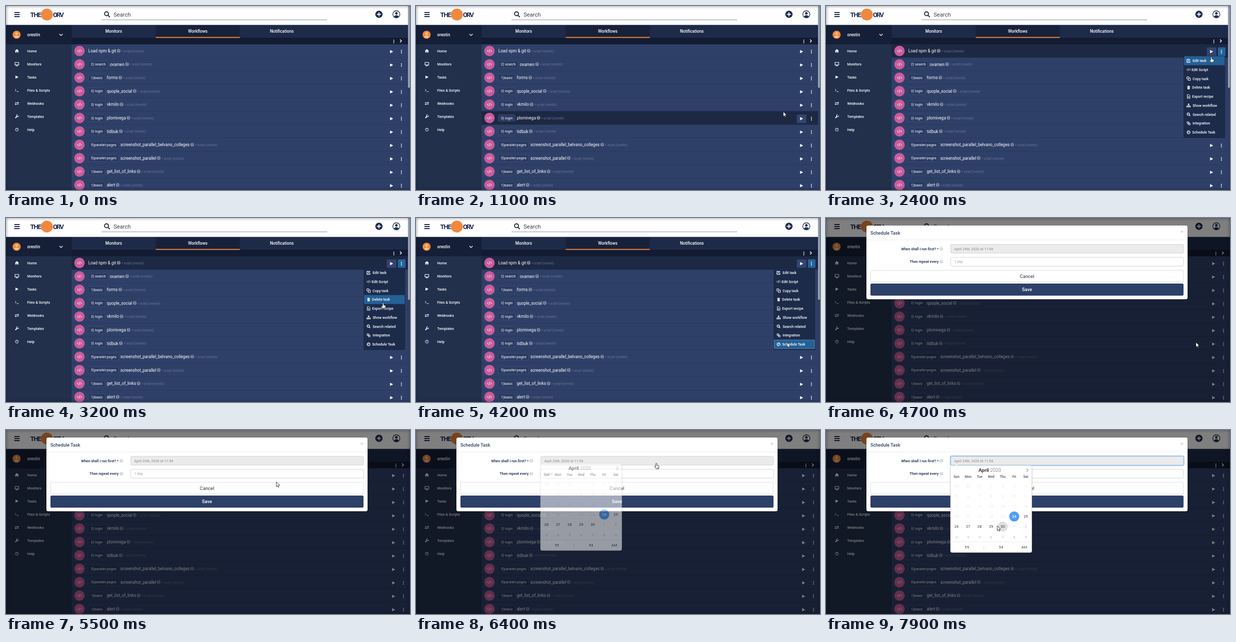
An HTML page that plays this animation: 800x365 px, repeating every 8000 ms.

```html
<!DOCTYPE html>
<html lang="en">
<head>
<meta charset="utf-8">
<title>Schedule a task</title>
<style>
html, body { margin: 0; width: 100%; height: 100%; overflow: hidden; background: #22304c; }
svg { position: absolute; left: 0; top: 0; display: block; }
text { font-family: Roboto, Arial, sans-serif; white-space: pre; }
.edge { position: absolute; left: 0; top: 0; width: 800px; height: 365px; box-shadow: inset 0 0 6px rgba(10, 15, 35, .5); }
.line { fill: none; stroke: currentColor; }
</style>
</head>
<body>
<svg id="stage" width="800" height="365" viewBox="0 0 800 365"></svg>
<div class="edge"></div>
<script>
const LOOP = 8000, STEP = 100;
const ROW_TOP = 75.8, ROW_H = 26.6, ITEM_TOP = 99.6, ITEM_H = 17.75;
const DAY_X = 258.5, DAY_Y = 111, DAY_W = 22.85, DAY_H = 20.2;
const NAVY = '#1c2b4f', ORANGE = '#f0883e';
const USER = 'orestin';
const svg = document.getElementById('stage');

// y is the vertical middle of the text
const text = (x, y, s, size, fill = '#fff', more = '') =>
  `<text x="${x}" y="${(y + size * .355).toFixed(2)}" font-size="${size}" fill="${fill}" ${more}>${s.replace(/&/g, '&amp;').replace(/</g, '&lt;')}</text>`;
const rect = (x, y, w, h, fill, more = '') =>
  `<rect x="${x}" y="${y}" width="${w}" height="${h}" fill="${fill}" ${more}/>`;
const circle = (x, y, r, fill, more = '') =>
  `<circle cx="${x}" cy="${y}" r="${r}" fill="${fill}" ${more}/>`;
const path = (d, fill = '#fff', more = '') => `<path d="${d}" fill="${fill}" ${more}/>`;
const stroke = (d, color = '#fff', w = 1, more = '') =>
  `<path d="${d}" class="line" color="${color}" stroke-width="${w}" ${more}/>`;
const group = (id, s, more = '') => `<g id="${id}" ${more}>${s}</g>`;
const at = (x, y, s) => `<g transform="translate(${x} ${y})">${s}</g>`;
const MID = 'text-anchor="middle"', END = 'text-anchor="end"';
const W5 = 'font-weight="500"', W7 = 'font-weight="700"';

const play = (x, y) => path(`M${x - 2.7} ${y - 3.2}l6 3.2-6 3.2z`);
const dots = (x, y) => [-2.7, 0, 2.7].map(d => circle(x, y + d, .95, '#fff')).join('');
const help = (x, y, back, front) => circle(x, y, 3.6, back) + text(x, y, '?', 5.6, front, MID + W7.padStart(18));
const code = (x, y, k = 1) => stroke(
  `M${x - 2.2 * k} ${y - 2 * k}l${-2.2 * k} ${2 * k} ${2.2 * k} ${2 * k}M${x + 2.2 * k} ${y - 2 * k}l${2.2 * k} ${2 * k} ${-2.2 * k} ${2 * k}M${x + .9 * k} ${y - 3 * k}l${-1.8 * k} ${6 * k}`, '#fff', .9);
const lens = (x, y, r, color, w) => stroke(
  `M${x + r} ${y}a${r} ${r} 0 1 0 ${-2 * r} 0a${r} ${r} 0 1 0 ${2 * r} 0M${x + r * .7} ${y + r * .7}l${r} ${r}`, color, w);

function header() {
  return rect(0, 0, 800, 37.5, '#fff') +
    stroke('M16.5 13h10.5M16.5 17h10.5M16.5 21h10.5', NAVY, 1.8) +
    text(48, 17, 'THE', 13, NAVY, W7 + ' letter-spacing="-1.2"') +
    circle(81, 17, 11.8, ORANGE) +
    text(93, 17, 'ORV', 13, NAVY, W7 + ' letter-spacing="-1.9"') +
    lens(199, 15.4, 3.9, '#222b40', 1.9) +
    text(213, 16.7, 'Search', 11.1, '#3a3d45') +
    rect(189, 27, 447, 1, '#8d8fb0') +
    circle(738.5, 16.5, 7.2, NAVY) + stroke('M734.5 16.5h8M738.5 12.5v8', '#fff', 1.8) +
    circle(773, 16.5, 7, '#fff', `stroke="${NAVY}" stroke-width="1.3"`) +
    circle(773, 14.4, 2.5, NAVY) + path('M768.2 20.4q4.8-4.4 9.6 0-4.8 5-9.6 0z', NAVY);
}

function sidebar() {
  const icons = [
    path('M-4 .3l4-3.8 4 3.8h-1.1v3.2h-2v-2.2h-1.8v2.2h-2v-3.2z'),
    stroke('M-3.7-3h7.4v4.8h-7.4zM-2 3.6h4', '#fff', 1.1),
    play(0, 0),
    stroke('M-3.6-2.4l2.2 2.2-2.2 2.2M-.4 2.6h4', '#fff', .9),
    stroke('M-3.8-1.4h6.6M3.8 1.6h-6.6', '#fff', 1.1) + path('M2-3.3l2.2 1.9-2.2 1.9zM-2-.3l-2.2 1.9 2.2 1.9z'),
    stroke('M-3 3l3.6-3.6', '#fff', 1.8) + stroke('M3.4-1.8a2 2 0 1 1-1.8-1.8', '#fff', 1.2),
    circle(0, 0, 3, 'none', 'stroke="#fff" stroke-width=".9"') + text(0, 0, '?', 5, '#fff', MID)
  ];
  const names = ['Home', 'Monitors', 'Tasks', 'Files & Scripts', 'Webhooks', 'Templates', 'Help'];
  return rect(0, 37.5, 130, 328, '#22304c') + rect(0, 37.5, 130, 38.5, '#151f38') +
    circle(21, 57, 8, ORANGE) + circle(21, 54.6, 2.6, '#f9c08f') + path('M16 61.6q5-6 10 0-5 3.4-10 0z', '#f9c08f') +
    text(42, 57, USER, 8.2, '#fff', W5) +
    stroke('M105.8 55.5l3.2 3.2 3.2-3.2', '#fff', 1.2) +
    names.map((s, i) => {
      const y = 89.5 + 26.05 * i;
      return at(21.5, y - .5, icons[i]) + text(42, y, s, 7.05, '#fff', W5);
    }).join('');
}

function tabs() {
  return rect(130, 37.5, 670, 26, '#1d2a48') + rect(130, 63, 670, 13, '#121b32') +
    group('active', rect(0, 37.5, 166.5, 26, '#17213a') + rect(0, 61.4, 166.5, 1.9, ORANGE)) +
    ['Monitors', 'Workflows', 'Notifications'].map(s => text(0, 50.3, s, 8.2, '#fff', `class="tab" ${MID} ${W5}`)).join('') +
    group('tools', dots(768, 70.3) + stroke('M780.2 66.4l3 2.9-3 2.9', '#fff', 1.4));
}

const ROWS = [
  ['', 'Load npm & git'], ['2) search', 'ovamen'], ['1)basic', 'forms'], ['3) login', 'quople_social'],
  ['3) login', 'vkmilo'], ['3) login', 'plomivega'], ['3) login', 'tidbuk'],
  ['5)parallel-pages', 'screenshot_parallel_belvano_colleges'], ['5)parallel-pages', 'screenshot_parallel'],
  ['1)basic', 'get_list_of_links'], ['1)basic', 'alert']
];

function width(s, size) {
  svg.innerHTML = text(0, 0, s, size);
  return svg.firstChild.getComputedTextLength();
}

function row([tag, name], i) {
  const y = ROW_TOP + ROW_H * (i + .5);
  const tagEnd = 168 + width(tag, 7.1);
  const x = tag ? tagEnd + 8 : 163;
  const end = x + width(name, 8.2);
  const pill = tag ? rect(163, y - 6.5, tagEnd - 158.5, 13, '#293a61', 'rx="2" stroke="#435279" stroke-width=".7"') + text(168, y, tag, 7.1) : '';
  return circle(145.5, y, 10.3, '#c95c9c') + code(145.5, y) + pill + text(x, y, name, 8.2) +
    help(end + 5.2, y - .3, '#7d879e', '#2f4068') +
    text(end + 11, y + .4, `» script (${USER})`, 6.3, '#67749a', 'font-style="italic"');
}

function list() {
  const lines = ROWS.map((r, i) => rect(130, ROW_TOP + ROW_H * (i + 1) - .8, 670, .8, '#273759')).join('');
  const hover = rect(130, 0, 670, ROW_H, '#1d2843') + rect(754, 6.4, 19, 17, '#33446f', 'rx="1.5"');
  const body = ROWS.map(row).join('');
  const acts = ROWS.map((r, i) => play(763.3, 90.5 + ROW_H * i) + dots(783, 90.5 + ROW_H * i)).join('');
  return rect(130, 76, 670, 290, '#2f4068') + lines + group('rowHover', hover) +
    group('dotBox', rect(776, 82, 15, 17, '#24649c', 'rx="1.5"')) + body + group('acts', acts);
}

function menu() {
  const page = 'M-2.6-3.6h3.6l1.8 1.8v5.4h-5.4z';
  const items = [
    ['Edit task', 726, stroke('M1-2.6h-4.2v5.8h5.8v-2.6M-1 1l4-4', '#fff', 1.2)],
    ['Edit Script', 724, code(0, 0, .85)],
    ['Copy task', 726, stroke('M-3.4-3.4h4v4h-4zM-.8 1.2v2.4h4.4v-4.6h-2.4', '#fff', 1)],
    ['Delete task', 725, path('M-2.8-2.8h1.7v-.8h2.2v.8h1.7v1h-5.6zM-2.4-1.2h4.8l-.4 4.8h-4z')],
    ['Export recipe', 725, stroke(page, '#fff', .9) + stroke('M-1.4 0h2.8M-1.4 1.8h2.8', '#fff', .9)],
    ['Show workflow', 726, path('M-1.2-3.4h2.4v2.2h-2.4zM-4 1.2h2.2v2.2h-2.2zM-1.1 1.2h2.2v2.2h-2.2zM1.8 1.2h2.2v2.2h-2.2z') + stroke('M0-1.4v3M-2.9 1.4v-1.4h5.8v1.4', '#fff', .7)],
    ['Search related', 726, lens(-.6, -.6, 2.3, '#fff', 1.3)],
    ['Integration', 726, [-1.4, 1.4].map(d => circle(d, d, 1.8, 'none', 'stroke="#fff" stroke-width="1.1"')).join('')],
    ['Schedule Task', 725, circle(0, 0, 2.9, 'none', 'stroke="#fff" stroke-width="1.2"') + stroke('M0-1.8v2h-1.4', '#fff', .9)]
  ];
  return rect(708.5, 99.2, 81.5, 162, '#1d2b4b', 'rx="1" stroke="#17233f" stroke-width=".6"') +
    rect(709, 0, 80.5, ITEM_H, '#246197', 'id="itemHover"') +
    rect(709.3, ITEM_TOP + ITEM_H * 8 + .4, 79.8, ITEM_H - .8, 'none', 'id="focusItem" stroke="#b9d3ea" stroke-width=".7" stroke-dasharray="1 1"') +
    items.map(([s, x, icon], i) => {
      const y = ITEM_TOP + ITEM_H * (i + .5);
      return at(718, y, icon) + text(x, y, s, 7.1, '#fff', W5);
    }).join('');
}

function modal() {
  const label = (y, s) => text(223, y, s, 7.1, '#2d3f66', END + ' ' + W7) + help(228.3, y, '#d4d7dc', '#fff');
  return rect(79, 16, 638, 147, 'rgba(0,0,0,.28)', 'rx="4"') + rect(80, 15, 636, 146.3, '#fff', 'rx="3.5"') +
    text(88, 29.3, 'Schedule Task', 9.15, '#2d3f66', W5) +
    stroke('M702.8 25.3l3.6 3.6M706.4 25.3l-3.6 3.6', '#a5a5a5', .9) +
    rect(80, 43, 636, .7, '#e3e5e8') +
    label(61, 'When shall I run first? *') + label(86.5, 'Then repeat every') +
    rect(246, 51.3, 463, 19.4, 'none', 'id="glow" rx="3" stroke="#a9cdf0" stroke-width="1.6"') +
    rect(247, 52.3, 461, 17.4, '#ebebeb', 'id="dateBox" rx="2.3" stroke="#c6c9cd" stroke-width=".8"') +
    text(254, 61.2, 'April 24th, 2020 at 11:54', 7.1, '#858a92') +
    rect(247, 78, 461, 17.4, '#fff', 'rx="2.3" stroke="#c6c9cd" stroke-width=".8"') +
    text(254, 86.8, '1 day', 7.1, '#9a9fa6') +
    rect(88.4, 103.6, 619.3, 23.4, '#fff', 'rx="2.5" stroke="#d3d5d9" stroke-width=".8"') +
    text(398, 115.2, 'Cancel', 9.3, '#2a2d33', MID) +
    rect(88, 130, 620, 24, '#2d4068', 'rx="2.5"') +
    text(398, 141.7, 'Save', 9.3, '#fff', MID + ' ' + W5);
}

function calendar() {
  const col = i => DAY_X + DAY_W * (i % 7);
  let s = rect(245.5, 71.5, 163, 173, 'rgba(0,0,0,.2)', 'rx="4"') +
    rect(246.5, 70.5, 161, 172.5, '#fff', 'rx="3" stroke="#dcdcdc" stroke-width=".6"') +
    path('M255.8 70.8l2.6-2.8 2.6 2.8z') +
    text(302, 79.8, 'April', 9.8, '#333', W7) + text(325, 79.8, '2020', 9.8, '#555', 'font-weight="300"') +
    stroke('M396.8 76.6l3.4 3.4-3.4 3.4', '#555', .9) +
    circle(0, 0, 10, '#dfdfdf', 'id="dayHover"') + circle(col(5), DAY_Y + DAY_H * 3, 10, '#519ff6');
  'Sun Mon Tue Wed Thu Fri Sat'.split(' ').forEach((d, i) => s += text(col(i), 92.7, d, 6.6, '#666', MID + ' ' + W7));
  for (let i = 0; i < 42; i++) {
    const n = i < 3 ? 29 + i : i < 33 ? i - 2 : i - 32;
    const fill = i === 26 ? '#fff' : i < 26 ? '#e6e6e6' : i < 33 ? '#393939' : '#bdbdbd';
    s += text(col(i), DAY_Y + DAY_H * Math.floor(i / 7), String(n), 7.4, fill, MID + (i === 26 ? ' ' + W5 : ''));
  }
  return s + rect(246.5, 221.6, 161, .7, '#e3e3e3') +
    text(279, 232.5, '11', 7.6, '#333', MID + ' ' + W7) + text(312.5, 232, ':', 7.6, '#333', MID) +
    text(346.5, 232.5, '54', 7.6, '#444', MID) + text(392.5, 232.5, 'AM', 7.4, '#444', MID);
}

function pointer() {
  const ink = 'stroke="#15171c" stroke-width=".8" stroke-linejoin="round"';
  return group('arrow', path('M0 0v9.6l2.2-2 1.4 3.2 1.6-.7-1.4-3.1h3.1z', '#fff', ink)) +
    group('hand', path('M-1.2 1.2Q-1.2 0 0 0T1.2 1.2V4.2L4.2 5Q5.4 5.4 5.2 6.6L4.4 11H-.4L-3.6 7Q-3.8 5.6-2.4 6L-1.2 7Z', '#fff', ink) +
      stroke('M1.4 8v2M3 8v2', '#15171c', .5));
}

const scene = sidebar() + tabs() + list() + header() +
  group('bar', rect(796, 37.5, 4, 328, '#33446c') + rect(796, 0, 4, 162, '#a9b2c6')) +
  group('menu', menu()) + rect(0, 0, 800, 365, '#000', 'id="shade"') +
  group('modal', modal()) + group('calendar', calendar()) + group('cursor', pointer());
svg.innerHTML = scene;

const $ = id => document.getElementById(id);
const set = (id, attrs) => Object.entries(attrs).forEach(([k, v]) => $(id).setAttribute(k, v));
const show = (id, on) => set(id, { visibility: on ? 'visible' : 'hidden' });
const move = (id, x, y) => set(id, { transform: `translate(${x} ${y})` });
const ramp = (t, start, len) => Math.min(1, Math.max(0, (t - start) / len));

// time, x, y
const TRAIL = [
  [300, 620, 380], [900, 690, 288], [1400, 783, 92], [2200, 783, 92], [2400, 763, 101],
  [2800, 752, 199], [3000, 750, 146], [3900, 735, 247], [4500, 735, 247], [4700, 732.5, 246.5],
  [5700, 486, 67], [6000, 476, 66], [7000, 476, 66], [7800, 363, 169], [7900, 339, 190], [8000, 338, 191]
];

function cursorAt(t) {
  const i = TRAIL.findIndex(k => k[0] > t);
  const a = TRAIL[Math.max(0, i - 1)], b = TRAIL[i];
  const p = ramp(t, a[0], b[0] - a[0] || 1);
  return [a[1] + (b[1] - a[1]) * p, a[2] + (b[2] - a[2]) * p];
}

function draw(t) {
  const [x, y] = cursorAt(t);
  const open = t >= 1600 && t < 4300, shaded = t >= 4300, shift = shaded ? 4 : 0;

  move('cursor', x, y);
  const hand = (t >= 1400 && t < 4100) || (t >= 5700 && t < 7100);
  show('hand', hand);
  show('arrow', !hand);

  const hovered = t >= 1400 ? 0 : Math.floor((y - ROW_TOP) / ROW_H);
  show('rowHover', !shaded && hovered < ROWS.length);
  move('rowHover', 0, ROW_TOP + ROW_H * hovered);
  show('dotBox', t >= 1400 && !shaded);

  // the page widens when the scrollbar goes away
  const tabW = shaded ? 167.5 : 166.5;
  show('bar', !shaded);
  move('acts', shift, 0);
  move('tools', shift, 0);
  move('active', 130 + tabW, 0);
  document.querySelectorAll('.tab').forEach((el, i) => el.setAttribute('x', 130 + tabW * (i + .5)));

  show('menu', open);
  set('menu', { opacity: ramp(t, 1500, 200) });
  const item = Math.floor((y - ITEM_TOP) / ITEM_H);
  set('itemHover', { y: ITEM_TOP + ITEM_H * item, opacity: open && item >= 0 ? 1 : 0 });
  set('focusItem', { opacity: open && t >= 4000 ? 1 : 0 });

  const drop = ramp(t, 4300, 300);
  set('shade', { opacity: .5 * ramp(t, 4200, 200) });
  set('modal', { opacity: drop });
  move('modal', 0, -101 * (1 - drop) ** 3);

  const focused = t >= 6500;
  set('glow', { opacity: focused ? 1 : 0 });
  set('dateBox', { stroke: focused ? '#7fb2e2' : '#c6c9cd' });

  const fade = ramp(t, 6300, 300);
  set('calendar', { opacity: 1 - (1 - fade) ** 2 });
  move('calendar', 0, -20 * (1 - fade) ** 4);
  const c = Math.round((x - DAY_X) / DAY_W), r = Math.round((y - DAY_Y) / DAY_H), day = r * 7 + c;
  set('dayHover', {
    cx: DAY_X + DAY_W * c, cy: DAY_Y + DAY_H * r,
    opacity: t > 7000 && c < 7 && day > 26 && day < 33 ? 1 : 0
  });
}

function tick() {
  const t = performance.now() % LOOP;
  draw(Math.floor(t / STEP) * STEP);
  requestAnimationFrame(tick);
}
tick();
</script>
</body>
</html>
```
